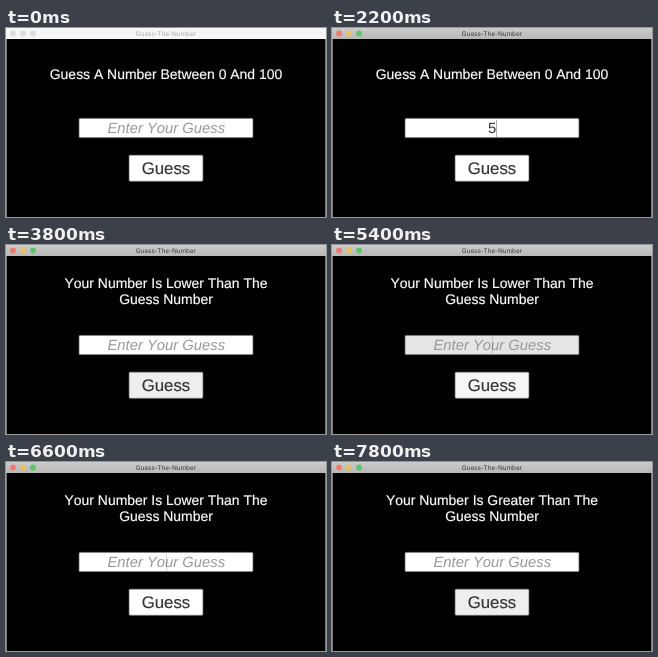
These frames come from a looping animation (320x189 px, 8000 ms). An HTML page:

```html
<!DOCTYPE html>
<html lang="en">
<head>
<meta charset="utf-8">
<title>Guess-The-Number</title>
<style>
  html, body { margin: 0; width: 100%; height: 100%; overflow: hidden; background: #000; }
  svg { display: block; width: 320px; height: 189px; }
  text {
    font-family: "Liberation Sans", Arial, sans-serif; font-kerning: none;
    text-anchor: middle; text-rendering: geometricPrecision;
  }
  .bar-title { font: 6.4px Inter, sans-serif; }
  .message { font-size: 13.95px; fill: #fff; stroke: #fff; stroke-width: .2px; }
  .input { font-size: 14.8px; fill: #323232; }
  .hint { font-style: italic; fill: #989898; }
  .label { font-size: 16.8px; fill: #323232; stroke: #323232; stroke-width: .15px; }
  .control { stroke: #8c8c8c; stroke-width: .6px; }
</style>
</head>
<body>
<svg viewBox="0 0 320 189">
  <defs>
    <linearGradient id="barShade" x2="0" y2="1">
      <stop stop-color="#cbcbcb"/>
      <stop offset="1" stop-color="#b8b8b8"/>
    </linearGradient>
  </defs>
  <rect width="320" height="189"/>
  <path d="M.5 11V189M319.5 11V189" stroke="#777"/>
  <rect id="bar" width="320" height="11"/>
  <g id="lights">
    <circle cx="7" cy="5.5" r="2.9"/>
    <circle cx="17" cy="5.5" r="2.9"/>
    <circle cx="27" cy="5.5" r="2.9"/>
  </g>
  <text id="barTitle" class="bar-title" x="160" y="8">Guess-The-Number</text>

  <text id="line1" class="message" x="160"></text>
  <text id="line2" class="message" x="160" y="58.8"></text>

  <rect id="field" class="control" x="73.1" y="90.4" width="173.8" height="19.2" rx="1.2"/>
  <text id="hint" class="input hint" x="160.3" y="105">Enter Your Guess</text>
  <text id="typed" class="input" x="160" y="105"></text>
  <rect id="caret" y="92" width="1" height="17" fill="#323232"/>

  <rect id="button" class="control" x="123.1" y="127.2" width="73.8" height="26" rx="1.2"/>
  <text class="label" x="160" y="146">Guess</text>
</svg>
<script>
const LOOP = 8000;
const DIGIT = 14.8 * 0.556;
const el = id => document.getElementById(id);
const lights = [...el("lights").children];

// Each list holds [start, value] steps; the latest started step applies.
const steps = {
  active: [[0, false], [700, true]],
  message: [
    [0, ["Guess A Number Between 0 And 100"]],
    [3800, ["Your Number Is Lower Than The", "Guess Number"]],
    [7800, ["Your Number Is Greater Than The", "Guess Number"]]
  ],
  typed: [[0, ""], [2200, "5"], [2400, "50"], [3800, ""], [6900, "7"], [7000, "75"], [7800, ""]],
  caret: [
    [0, false], [1700, true], [3000, false], [3500, true], [3600, false],
    [5400, true], [6000, false], [6600, true], [7600, false]
  ],
  field: [[0, "#fff"], [5400, "#e5e5e5"], [5500, "#fff"]],
  button: [[0, "#fff"], [3500, "#eee"], [5400, "#f6f6f6"], [5500, "#fff"], [7500, "#eee"]]
};

const at = (list, time) => list.filter(([start]) => start <= time).pop()[1];
const show = (id, visible) => el(id).setAttribute("visibility", visible ? "visible" : "hidden");
const fill = (node, color) => node.setAttribute("fill", color);

function render(time) {
  const active = at(steps.active, time);
  fill(el("bar"), active ? "url(#barShade)" : "#f6f6f6");
  fill(el("barTitle"), active ? "#3a3a3a" : "#aaa");
  const colors = active ? ["#ee7a74", "#e8c266", "#5fc46c"] : ["#dcdcdc", "#dcdcdc", "#dcdcdc"];
  lights.forEach((light, i) => fill(light, colors[i]));

  const [first, second = ""] = at(steps.message, time);
  el("line1").textContent = first;
  el("line1").setAttribute("y", second ? 42.8 : 50.8);
  el("line2").textContent = second;

  const typed = at(steps.typed, time);
  el("typed").textContent = typed;
  show("hint", !typed);
  show("caret", at(steps.caret, time));
  el("caret").setAttribute("x", Math.round(159.5 + typed.length * DIGIT / 2));
  el("caret").setAttribute("opacity", typed ? 0.4 : 0.2);

  fill(el("field"), at(steps.field, time));
  fill(el("button"), at(steps.button, time));
}

const origin = performance.now();
function tick() {
  render((performance.now() - origin) % LOOP);
  requestAnimationFrame(tick);
}
tick();
</script>
</body>
</html>
```
